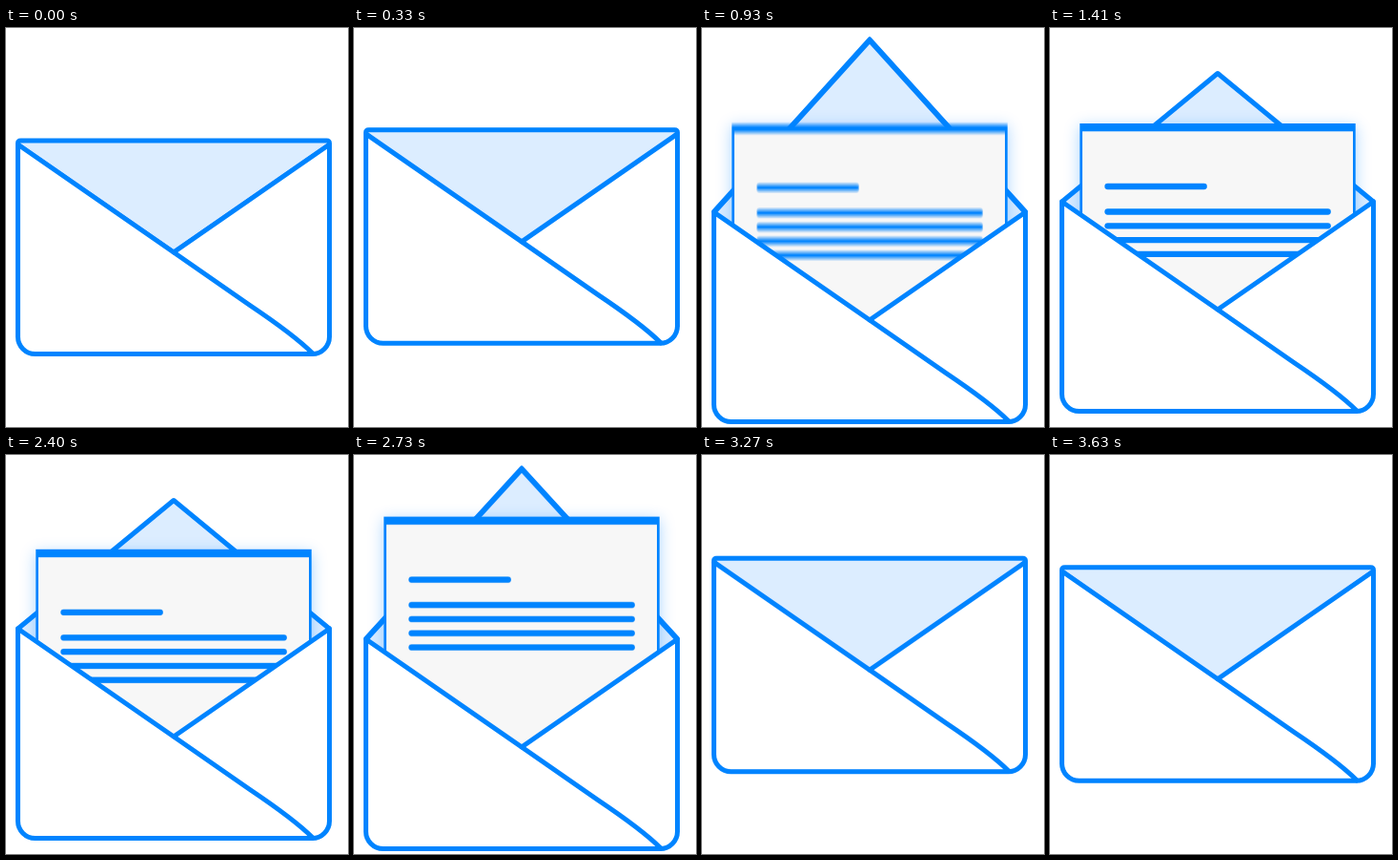
Write an HTML page with a canvas that moves like this. It is 359 px wide and 418 px high and loops after 4.14 s.

```html
<!DOCTYPE html>
<html lang="en">
<head>
<meta charset="utf-8">
<title>Opening envelope</title>
<style>
  html, body { margin: 0; width: 100%; height: 100%; overflow: hidden; background: #fff; }
  canvas { display: block; }
</style>
</head>
<body>
<canvas id="stage" width="359" height="418"></canvas>
<script>
const W = 359, H = 418;
const LOOP = 4140, STEP = 30, MOVE = 1230;
const SHUTTER = 9, SAMPLES = 9;
const BLUE = '#0084ff', PALE = '#dcedff', PAPER = '#f7f7f7';
const LEFT = 12.5, RIGHT = 339.5, MID = 176, RIM = 122;

const stage = document.getElementById('stage').getContext('2d');
const layer = document.createElement('canvas');
layer.width = W;
layer.height = H;
const ctx = layer.getContext('2d');

const front = new Path2D(
  `M${LEFT} ${RIM}L${MID} 235L${RIGHT} ${RIM}V323.5a18 18 0 0 1 -18 18H30.5a18 18 0 0 1 -18 -18Z`);
const fold = new Path2D(`M${MID} 235L256 290.5Q303 322 322 341`);
const back = new Path2D(`M${LEFT} ${RIM}H${RIGHT}L${MID} 235Z`);
const rim = new Path2D(`M${LEFT} 124V121q0 -3 3 -3H336.5q3 0 3 3V124`);
const flapFill = new Path2D(`M${LEFT} 0L${MID} -134.5L${RIGHT} 0Z`);
const flapEdge = new Path2D(`M${LEFT} 0L${MID} -134.5L${RIGHT} 0`);

// Ease in and out with a strong pull-back at both ends
function backEase(u) {
  const s = 3.95;
  const half = x => x * x * ((s + 1) * x - s) / 2;
  u = Math.min(1, Math.max(0, u));
  return u < 0.5 ? half(2 * u) : 1 - half(2 - 2 * u);
}

function progress(t, openAt, closeAt) {
  return t < 1900 ? backEase((t - openAt) / MOVE) : 1 - backEase((t - closeAt) / MOVE);
}

function drawFlap(scale) {
  ctx.save();
  ctx.translate(0, RIM);
  ctx.scale(1, scale);
  ctx.fillStyle = PALE;
  ctx.fill(flapFill);
  ctx.stroke(flapEdge);
  ctx.restore();
}

function textLine(y, x2) {
  ctx.beginPath();
  ctx.moveTo(60.5, y);
  ctx.lineTo(x2, y);
  ctx.stroke();
}

function drawPaper(top) {
  ctx.save();
  ctx.beginPath();
  ctx.rect(0, -200, W, 536);
  ctx.clip();
  ctx.translate(0, top);

  ctx.save();
  ctx.shadowColor = 'rgba(0,132,255,0.32)';
  ctx.shadowBlur = 15;
  ctx.shadowOffsetY = 3;
  ctx.fillStyle = BLUE;
  ctx.fillRect(31.3, 0, 289.4, 300);
  ctx.restore();

  ctx.fillStyle = PAPER;
  ctx.fillRect(34, 8.3, 284, 292);
  ctx.lineWidth = 6.3;
  textLine(66, 161.7);
  for (let i = 0; i < 4; i++) textLine(92.5 + i * 14.8, 291.7);
  ctx.restore();
}

function drawScene(t) {
  const drop = 60 * progress(t, 0, 2430);
  const flap = -0.84 + 1.84 * progress(t, 15, 2446);
  const paperTop = 297 - 257 * progress(t, 175, 2370);

  ctx.fillStyle = '#fff';
  ctx.fillRect(0, 0, W, H);
  ctx.save();
  ctx.translate(0, drop);
  ctx.strokeStyle = BLUE;
  ctx.lineWidth = 5;
  ctx.lineCap = ctx.lineJoin = 'round';

  if (flap >= 0) drawFlap(flap);
  ctx.fillStyle = PALE;
  ctx.fill(back);
  drawPaper(paperTop);
  if (flap < 0) {
    ctx.fillStyle = PALE;
    ctx.fillRect(LEFT, 118, RIGHT - LEFT, 4.5);
    drawFlap(flap);
  }
  ctx.fillStyle = '#fff';
  ctx.fill(front);
  ctx.stroke(front);
  ctx.stroke(fold);
  if (flap < 0) ctx.stroke(rim);
  ctx.restore();
}

// Average several moments for motion blur
function render(t) {
  for (let i = 0; i < SAMPLES; i++) {
    drawScene(t + SHUTTER * (i / (SAMPLES - 1) - 0.5));
    stage.globalAlpha = 1 / (i + 1);
    stage.drawImage(layer, 0, 0);
  }
}

const start = performance.now();
let shown = -1;

function tick() {
  const elapsed = Math.max(0, performance.now() - start) % LOOP;
  const t = Math.floor(elapsed / STEP) * STEP;
  if (t !== shown) render(shown = t);
  requestAnimationFrame(tick);
}
tick();
</script>
</body>
</html>
```
